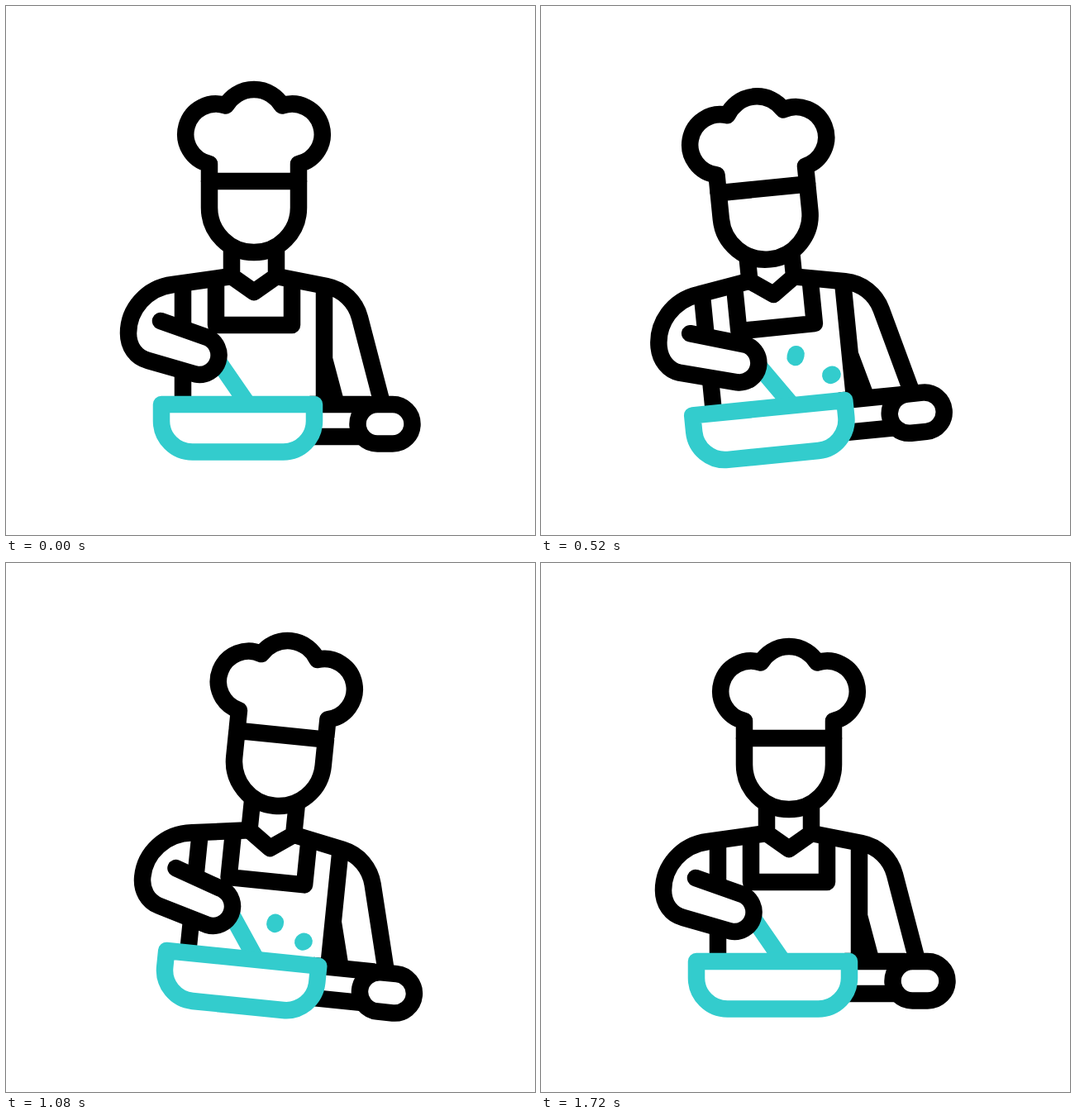
Animation, 640 px wide and 640 px high, one loop 1.84 s. Source, as an HTML page:

```html
<!DOCTYPE html>
<html lang="en">
<head>
<meta charset="utf-8">
<title>Chef stirring a pan</title>
<style>
  html, body { margin: 0; height: 100%; overflow: hidden; background: #fff; }
  svg { display: block; width: 100%; height: 100%; }
  .line { fill: none; stroke: #000; stroke-width: 20.5; stroke-linecap: round; stroke-linejoin: round; }
  .solid { fill: #fff; }
  .teal { stroke: #33cccd; }
</style>
</head>
<body>
<svg viewBox="0 0 640 640">
  <g id="chef" class="line">
    <path d="M273 290V327L300 346L327 327V290"/>
    <path d="M214 340V475M385 344V475M385 427L398 476M254 336V386H346V336"/>
    <path d="M327 327L388 339C408 343 423 358 428 377L453.5 475"/>
    <g id="head">
      <path id="hat" d="M246 212V191A36.7 36.7 0 1 1 266 120.5A39.5 39.5 0 0 1 334 120.5A36.7 36.7 0 1 1 354 191V212"/>
      <path class="solid" d="M246 212V244A54 54 0 0 0 354 244V212Z"/>
    </g>
    <path id="spoon" class="teal" d="M250 420L290 478"/>
    <path id="forearm" class="solid" stroke="none"/>
    <path id="arm"/>
    <path d="M368 482H440M368 521H430"/>
    <rect class="solid" x="425.5" y="482" width="66" height="47.5" rx="23.75"/>
    <path class="teal drop" pathLength="1" d="M310 482Q312 391 364 380.5"/>
    <path class="teal drop" pathLength="1" d="M338 482Q338 443 404 443"/>
    <path class="teal solid" d="M188 482H373V502A37.5 37.5 0 0 1 335.5 539.5H225.5A37.5 37.5 0 0 1 188 502Z"/>
  </g>
</svg>
<script>
const LOOP = 1840, STEP = 40;
const $ = id => document.getElementById(id);
const drops = document.querySelectorAll('.drop');

// Keys are [time, value] pairs, eased in and out between neighbours.
const TILT = [[100, 0], [630, -6.4], [1155, 6.5], [1690, 0]];
const NOD = [[100, 0], [350, 10.5], [880, -11], [1200, 0]];
const HAT = [[460, 0], [840, -14], [1200, 0]];
const STIR = [[100, 0], [560, 17], [930, 0], [1370, 17], [1700, 0]];
const TOSSES = [[360, 320], [920, 420]];   // start, flight time
const LAG = 0.12, TAIL = 70;

const clamp = x => Math.min(1, Math.max(0, x));
const ease = x => x * x * (3 - 2 * x);

function valueAt(keys, t) {
  let value = keys[0][1];
  for (let i = 1; i < keys.length; i++) {
    const [t0, v0] = keys[i - 1], [t1, v1] = keys[i];
    value += (v1 - v0) * ease(clamp((t - t0) / (t1 - t0)));
  }
  return value;
}

function drawArm(s) {
  const e = s * 0.47, lift = s * 0.12;
  const tip = `${187 + e} ${381 + lift}`;
  const under = `${172 + e * 0.7} 429`;
  const hand = `L${229.4 + s} ${445.5 + lift}A23.5 23.5 0 0 0 ${243.6 + s} ${401 + lift}L${tip}`;
  $('forearm').setAttribute('d', `M${tip}L${under}${hand}Z`);
  $('arm').setAttribute('d', `M273 327L${202 + e} 337C${170 + e} 341 ${148 + e} 367 ${148 + e} 396` +
    `C${148 + e} 412 ${157 + e} 425 ${under}${hand}`);
  $('spoon').setAttribute('transform', `translate(${s} 0)`);
}

function drawDrops(t) {
  const toss = TOSSES.find(([start, flight]) => t > start && t < start + flight + TAIL);
  drops.forEach(drop => {
    drop.style.visibility = toss ? 'visible' : 'hidden';
    if (!toss) return;
    const [start, flight] = toss;
    const front = clamp((t - start) / flight);
    const length = LAG * front * front * (1 - clamp((t - start - flight) / TAIL));
    drop.style.strokeDasharray = `${Math.max(length, 0.001)} 2`;
    drop.style.strokeDashoffset = length - front;
  });
}

function frame(now) {
  const t = Math.floor(now % LOOP / STEP) * STEP;   // 25 pictures a second
  $('chef').setAttribute('transform', `rotate(${valueAt(TILT, t)} 320 537)`);
  $('head').setAttribute('transform', `translate(0 ${valueAt(NOD, t)})`);
  $('hat').setAttribute('transform', `translate(0 ${valueAt(HAT, t)})`);
  drawArm(valueAt(STIR, t));
  drawDrops(t);
  requestAnimationFrame(now => frame(Math.max(0, now - origin)));
}

const origin = performance.now();
frame(0);
</script>
</body>
</html>
```
